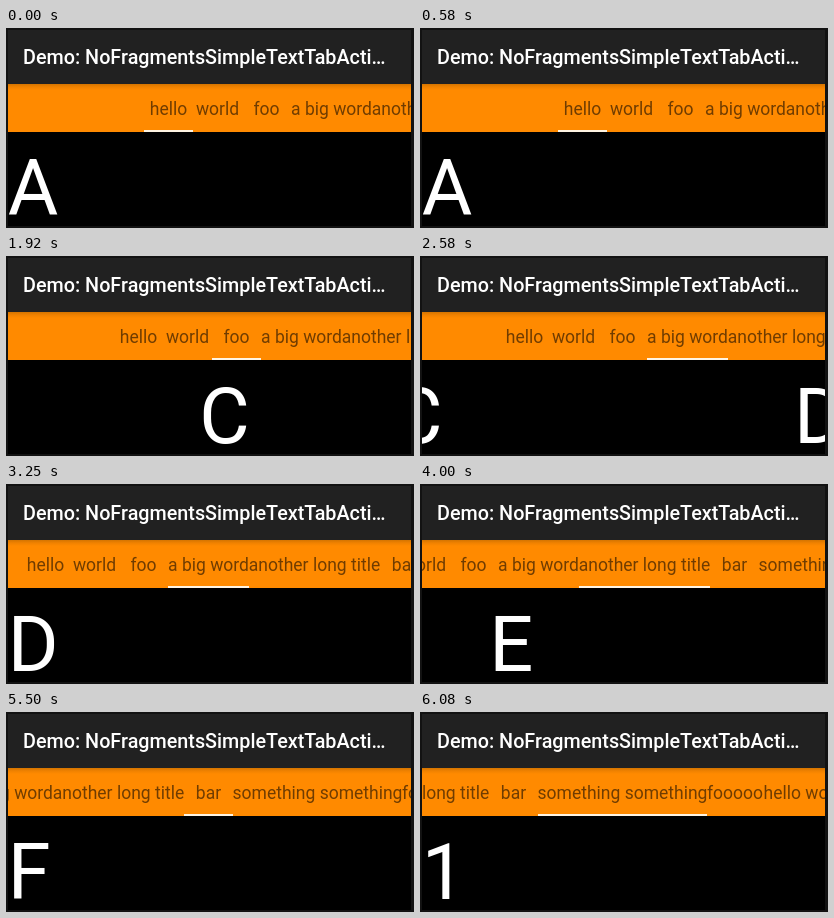
Animation of 408x200 px, one loop 6160 ms. Source, as an HTML page:

```html
<!DOCTYPE html>
<html lang="en">
<head>
<meta charset="utf-8">
<title>Swipeable tabs</title>
<style>
  html, body { margin: 0; width: 100%; height: 100%; overflow: hidden; background: #121212; }
  body { position: relative; font-family: Roboto, "Noto Sans", sans-serif; }
  div { position: absolute; white-space: pre; }
  #title {
    left: 2px; top: 2px; width: 403px; height: 54px; background: #212121;
    color: #fff; font-size: 19.75px; font-weight: 500; line-height: 55px; text-indent: 15px;
  }
  #bar {
    left: 2px; top: 56px; width: 403px; height: 48px; overflow: hidden;
    background: linear-gradient(#d47400, #f08200 3px, #ff8a00 6px);
  }
  #strip { left: 0; top: 0; height: 48px; }
  .tab {
    top: 0; height: 48px; display: flex; justify-content: center;
    font-size: 17.5px; line-height: 50px; color: rgba(0, 0, 0, .56);
  }
  #mark { top: 46px; height: 2px; background: #fff4e2; }
  #view { left: 2px; top: 104px; width: 403px; height: 94px; overflow: hidden; background: #000; }
  #pages { left: 0; top: 0; }
  .page { left: 0; top: 11px; font-size: 77.5px; line-height: 92px; color: #fff; }
</style>
</head>
<body>
<div id="title">Demo: NoFragmentsSimpleTextTabActi…</div>
<div id="bar"><div id="strip"><div id="mark"></div></div></div>
<div id="view"><div id="pages"></div></div>
<script>
const LOOP = 6160, PAGE = 402, FPS = 12;
const tabs = [
  ["hello", 49], ["world", 49], ["foo", 49], ["a big word", 81],
  ["another long title", 131], ["bar", 49], ["something something", 169],
  ["fooooo", 56], ["hello world", 86]
];
// Start and end of each swipe to the next page, in ticks
const swipes = [[8, 16], [19, 27], [30, 38], [42, 50], [59, 66], [66, 73]];
const $ = id => document.getElementById(id);

function add(parent, cls, text, left) {
  const el = document.createElement("div");
  el.className = cls;
  el.textContent = text;
  el.style.left = left + "px";
  parent.append(el);
  return el;
}

let x = 0;
const slots = tabs.map(([text, width]) => {
  const slot = { x, width, scroll: Math.min(136, 200.5 - x - width / 2) };
  add($("strip"), "tab", text, x).style.width = width + "px";
  x += width;
  return slot;
});
[..."ABCDEF1"].forEach((letter, i) => add($("pages"), "page", letter, i * PAGE - 0.3));

const progress = (t, from, to) => Math.min(1, Math.max(0, (t - from) / (to - from)));
const ease = u => 1 - (1 - u ** 1.5) ** 1.7;

function draw() {
  const tick = Math.floor((performance.now() % LOOP + 4) * FPS / 1000);
  let page = 0, selected = 0, scroll = slots[0].scroll;
  swipes.forEach(([from, to], i) => {
    page += ease(progress(tick, from, to));
    if (tick > from) selected = i + 1;
    // The strip follows one tick behind the page
    scroll += (slots[i + 1].scroll - slots[i].scroll) * ease(progress(tick, from + 1, to));
  });
  const { x, width } = slots[selected];
  $("mark").style.left = x + "px";
  $("mark").style.width = width + "px";
  $("strip").style.transform = `translateX(${scroll}px)`;
  $("pages").style.transform = `translateX(${-page * PAGE}px)`;
  requestAnimationFrame(draw);
}
draw();
</script>
</body>
</html>
```
